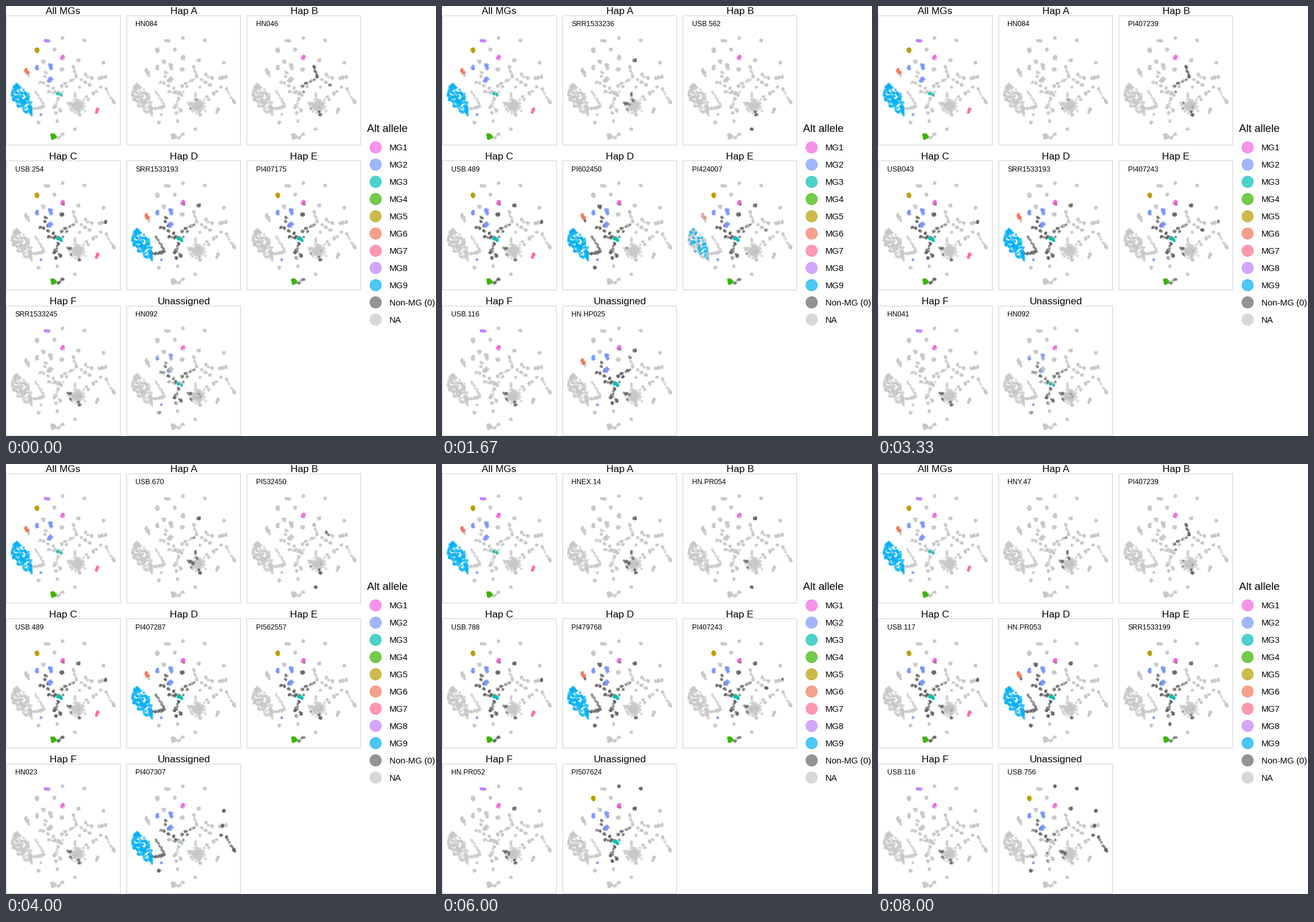
Write a matplotlib script that moves like this. It is 748x748 px and loops after 8.33 s.

```python
import numpy as np
import matplotlib.pyplot as plt
from matplotlib.animation import FuncAnimation
from matplotlib.colors import to_rgba
from matplotlib.patches import Circle, Rectangle

SIZE, DPI = 748, 100
PX = 72 / DPI
COL, ROW = 209.4, 252.4
ALPHA = 0.7
TICKS, LOOP_MS = 25, 8330

COLORS = {
    "MG1": "#F564E3", "MG2": "#7997FF", "MG3": "#00C0B4", "MG4": "#39B600",
    "MG5": "#B79F00", "MG6": "#F5785A", "MG7": "#FF6C90", "MG8": "#BF80FF",
    "MG9": "#00B0F6", "Non-MG (0)": "#666666", "NA": "#C8C8C8",
}

rng = np.random.default_rng(7)
keys, chunks = [], []


def add(key, xy):
    chunks.append(xy)
    keys.extend([key] * len(xy))


def blob(key, spread, count, *centres):
    """Scatter count dots in a disc or ellipse round every centre."""
    for centre in centres:
        angle = rng.uniform(0, 2 * np.pi, count)
        radius = np.sqrt(rng.uniform(0, 1, count))
        ring = np.column_stack([np.cos(angle), np.sin(angle)])
        add(key, np.array(centre) + ring * radius[:, None] * np.array(spread))


def trail(key, count, jitter, *points):
    """Dots along a polyline."""
    px, py = np.array(points, float).T
    s = np.linspace(0, len(points) - 1, count)
    k = np.arange(len(points))
    xy = np.column_stack([np.interp(s, k, px), np.interp(s, k, py)])
    add(key, xy + rng.normal(0, jitter, xy.shape))


def cloud(key, count):
    x, y = rng.uniform(9, 46, count), rng.uniform(135, 190, count)
    rows = [135, 142, 150, 158, 166, 174, 182, 190]
    left = np.interp(y, rows, [15, 12, 10, 9, 13, 20, 30, 41])
    right = np.interp(y, rows, [19, 27, 37, 42, 44, 44, 44, 45])
    inside = (x > left) & (x < right)
    add(key, np.column_stack([x, y])[inside])


def star(key, cx, cy):
    blob(key, 7, 34, (cx, cy))
    for angle in np.arange(14) * np.pi / 7 + 0.1:
        reach = rng.uniform(9, 17)
        end = (cx + reach * np.cos(angle), cy + reach * np.sin(angle))
        trail(key, 4, 0.6, (cx, cy), end)


# Dots that are grey in every panel
blob("rest", 2, 7, (84, 76), (149, 125), (152, 152), (138, 133), (163, 126))
blob("rest", 1.4, 3, (143, 163), (157, 149), (131, 128), (140, 157), (128, 141))

# Grey or dark groups
star("hub", 125, 174)
trail("hubn", 6, 0.8, (119, 151), (120, 157), (123, 165))
blob("hubw", 2, 4, (111, 170), (115, 173))
blob("hubw", 0.8, 1, (107, 169), (113, 180))
blob("hubs", 1.7, 5, (128, 189))
blob("hubs", 1, 2, (126, 184))
blob("top", 1.8, 6, (98.5, 55.5), (136.5, 59.5))
blob("ne", 2, 7, (126, 94.5))
blob("n1", 2.4, 8, (97, 110))
blob("ear", 2.6, 8, (64.6, 96.5))
blob("mid", 1.6, 3, (60, 133), (66, 134), (67, 123), (73, 139))
blob("mid", 2.6, 3, (69, 116), (72, 129))
blob("hook", 1.6, 4, (75, 149.5), (83, 143))
blob("hook", 2.2, 6, (85, 150))
trail("hook", 3, 0.8, (80, 151), (91, 149))
blob("steps", 1.8, 5, (103, 134), (97, 139))
blob("steps", 1.4, 3, (105, 141), (114, 129))
trail("steps", 4, 1, (100, 148), (108, 136), (118, 128))
blob("lon", 2, 6, (118, 106), (122, 122))
trail("lon", 3, 0.7, (119, 112), (121, 117))
blob("south", 1.7, 5, (91, 161), (84, 176), (86, 186), (94, 182))
trail("south", 3, 0.8, (89, 165), (85, 172))
trail("south", 2, 0.8, (89, 175), (92, 179))
trail("tail", 15, 1.1, (44, 177), (52, 179), (60, 178), (66, 174))
trail("tail", 9, 0.8, (50, 148), (57, 158), (62, 167), (65, 174))
blob("right", 2, 7, (169.5, 98.5), (167, 124.5))
blob("right", 1.5, 4, (164.5, 141.5), (174.5, 144))
trail("right", 6, 0.5, (174.5, 144), (178.5, 152), (183, 160), (186, 164))
blob("right", 2.4, 8, (187.5, 167))
blob("east", 2, 6, (172.5, 123.5))
blob("e1", 2, 6, (146, 137))
blob("e2", 1.7, 5, (138, 119))
blob("e2", 1, 2, (142, 123))
blob("sw", 2, 6, (57, 202))
blob("s1", 1.5, 4, (89, 200))
blob("s2", 1.7, 5, (120, 214))
blob("foot", 1.5, 4, (91, 229), (98.5, 223.5))
trail("foot", 2, 0.5, (93, 227), (96, 225))

# Marker groups
cloud("MG9", 235)
blob("MG8", 1.9, 5, (69, 59), (74, 61))
blob("MG5", (3.6, 2.6), 13, (54, 76.5))
blob("MG5", 1, 2, (54, 80))
blob("MG6", (2.2, 2.8), 8, (35.5, 112), (37.5, 116))
blob("ear", 0.8, 2, (39.5, 121))
blob("MG2", (2, 3), 9, (54, 107))
blob("MG2", (3.2, 2.2), 9, (77, 103))
blob("MG2", 2.2, 6, (78, 109))
blob("MG2", (3.8, 2.1), 9, (79, 126))
blob("MG2", 2.1, 6, (76, 130.5))
blob("MG2", 0.7, 2, (61, 188.5))
blob("MG1", 1.8, 6, (99, 88))
blob("MG1", 1.4, 4, (97, 91))
blob("steps", 0.5, 1, (100, 92.5))
blob("MG3", (3.2, 2.1), 13, (92.5, 152.5))
blob("MG3", 1.4, 4, (96, 155))
blob("MG4", (4.8, 4.2), 27, (82, 227))
blob("MG7", 1.8, 6, (159, 180))
blob("MG7", 1.4, 5, (157.5, 184.5))

DOTS = np.concatenate(chunks)
RANK = rng.uniform(0, 1, len(DOTS))
MEMBERS = {key: np.array(keys) == key for key in set(keys)}

C = "MG1 MG2 MG3 MG4 MG5 MG7 mid hook steps*.7 south n1 foot east hubw*.5 hubs*.4 "
D = "MG1 MG2 MG3 MG6 MG9 mid tail*.9 hook steps*.8 south "
E = "MG1 MG2 MG3 MG4 MG5 mid*.9 hook steps*.8 south*.9 foot*.7 hub*.05 n1 "
F = "MG1 MG8 hubw*.5 hubs*.7 hub*.03 "

# Title, (column, row), order of the samples, samples as (label, "group*share ...")
PANELS = [
    ("Hap A", (1, 0), "035214620563104235614026", [
        ("HN084", "hubn*.2 hub*.03"),
        ("SRR1533236", "ne*.7 hubw*.7 hubn*.3"),
        ("USB.317", "hubn*.4 hubs"),
        ("USB.670", "ne hubw hubn*.6 hubs steps*.1"),
        ("USB.787", "ne*.8 hubw*.8 hubn*.2 hubs*.6"),
        ("HNEX.14", "ne*.7 hubw hubn*.4 hubs*.7 hub*.05"),
        ("HNY.47", "hubn*.5 hubw*.5 steps*.1 hub*.04"),
    ]),
    ("Hap B", (2, 0), "026315026153064215302616", [
        ("HN046", "MG1 lon steps*.5 e1*.5 hubs*.7 hub*.03"),
        ("USB.562", "MG1 hubs*.7 s2"),
        ("PI378684A", "MG1 lon steps*.5 e1 hubs*.5 s1"),
        ("PI532450", "MG1 e2*.5 hub*.05 hubs s2 lon*.1"),
        ("SRR1533162", "MG1 MG9*.4 MG2*.12 MG3*.3 mid*.2 tail*.4 steps*.4 lon*.8 ne*.6 hook*.3"),
        ("HN.PR054", "MG1 ne hubw*.5 s2"),
        ("PI407239", "MG1 lon steps*.5 hub*.06 hubw*.3 hubs"),
    ]),
    ("Hap C", (0, 1), "042516024653024615042156", [
        ("USB.254", C),
        ("USB.489", C + "ne"),
        ("USB.799", C),
        ("USB.489", C + "ne*.9"),
        ("USB043", C + "ear*.3"),
        ("USB.788", C + "ne"),
        ("USB.117", C + "hub*.08"),
    ]),
    ("Hap D", (1, 1), "063512420613504165230416", [
        ("SRR1533193", D + "ne*.6"),
        ("PI602450", D + "ear sw hubw*.3 lon*.1"),
        ("SRR1533188", D + "ne*.6 hubs*.5"),
        ("PI407287", D + "n1"),
        ("PI407240", D + "n1 ear*.5"),
        ("PI479768", D + "ear ne sw hubs*.5"),
        ("HN.PR053", D + "ear ne sw hubs*.4"),
    ]),
    ("Hap E", (2, 1), "052613025463124035602346", [
        ("PI407175", E + "hubs*.6"),
        ("PI424007", E + "MG6*.4 MG9*.4 ne*.6 e1*.5"),
        ("PI378690", E + "e1 hubw*.4"),
        ("PI562557", E + "hubs"),
        ("PI378684B", E + "ne*.7 e1 e2*.5 east*.5 s1"),
        ("PI407243", E + "ne e1 hubw*.5 east*.5"),
        ("SRR1533199", E + "ne*.8 hubs*.6 s1"),
    ]),
    ("Hap F", (0, 2), "031313522503024105013506", [
        ("SRR1533245", F + "hub*.05"),
        ("USB.116", F),
        ("HN041", F),
        ("HN023", F),
        ("SRR1533245", F + "hub*.05"),
        ("HN.PR052", F + "hubw*.9 ne*.7"),
        ("USB.116", F),
    ]),
    ("Unassigned", (1, 2), "025316420363154025613046", [
        ("HN092", "MG1*.5 MG2*.6 MG3*.8 mid*.4 hook*.6 steps*.6 south*.8 hub*.1 hubw*.5 sw*.3"),
        ("HN.HP025", "MG1 MG2 MG3 MG6 mid*.9 hook steps south ne*.6 hubw*.7 lon*.3"),
        ("PI378698", "MG1 MG5*.5 MG2*.12 lon steps*.7 e1 hubn*.3 s1 mid*.3 hub*.05"),
        ("PI407307", "MG1 MG2 MG9 MG3*.12 mid*.6 tail hook*.8 steps*.6 right sw"),
        ("SoyW02", "MG1 MG2 MG6 mid*.5 hook*.7 tail*.5 steps*.5 south*.5 hub*.12 hubw right sw ne*.5"),
        ("PI507624", "MG1 MG2 MG3 MG5 top ne mid*.6 hook steps*.8 south"),
        ("USB.756", "MG1 MG2 MG5*.9 top ne*.6 mid*.6 hook*.7 steps*.3 south*.3 tail*.2 right sw hubw"),
    ]),
]
OVERVIEW = "MG1*.85 MG2*.95 MG3*.8 MG4 MG5*.9 MG6*.85 MG7*.85 MG8*.9 MG9"


def paint(spec):
    colors = np.tile(to_rgba(COLORS["NA"], ALPHA), (len(DOTS), 1))
    for item in spec.split():
        key, _, share = item.partition("*")
        chosen = MEMBERS[key] & (RANK < float(share or 1))
        colors[chosen] = to_rgba(COLORS.get(key, COLORS["Non-MG (0)"]), ALPHA)
    return colors


fig = plt.figure(figsize=(SIZE / DPI, SIZE / DPI), dpi=DPI, facecolor="white")
ax = fig.add_axes([0, 0, 1, 1])
ax.set_xlim(0, SIZE)
ax.set_ylim(SIZE, 0)
ax.axis("off")


def write(x, y, text, size, **style):
    return ax.text(x, y, text, fontsize=size * PX, family="Liberation Sans",
                   va="baseline", color="black", **style)


def panel(title, cell, spec):
    dx, dy = cell[0] * COL, cell[1] * ROW
    dots = ax.scatter(DOTS[:, 0] + dx, DOTS[:, 1] + dy, s=(4.7 * PX) ** 2,
                      c=paint(spec), linewidths=0, zorder=2)
    ax.add_patch(Rectangle((0.6 + dx, 17 + dy), 198, 224.8, fill=False,
                           ec="#E5E5E5", lw=2 * PX, zorder=3))
    write(99.6 + dx, 14.2 + dy, title, 17.3, ha="center", zorder=4)
    return dots, write(15.8 + dx, 35.2 + dy, "", 12.4, zorder=4)


def legend():
    write(628.5, 219.4, "Alt allele", 18.8)
    for i, (name, color) in enumerate(COLORS.items()):
        y = 246 + 29.95 * i
        ax.add_patch(Circle((643, y), 9.9, fc=to_rgba(color, ALPHA),
                            ec=to_rgba(color, ALPHA), lw=PX))
        write(667, y + 5.4, name, 15)


panel("All MGs", (0, 0), OVERVIEW)
views = [panel(title, cell, "") for title, cell, _, _ in PANELS]
looks = [[paint(spec) for _, spec in samples] for *_, samples in PANELS]
legend()


def draw(tick):
    step = max(0, tick - 1)  # the first sample set is held for two ticks
    changed = []
    for (dots, label), look, (_, _, order, samples) in zip(views, looks, PANELS):
        pick = int(order[step])
        dots.set_facecolors(look[pick])
        label.set_text(samples[pick][0])
        changed += [dots, label]
    return changed


anim = FuncAnimation(fig, draw, frames=TICKS, interval=LOOP_MS / TICKS,
                     repeat=True, repeat_delay=0)
plt.show()
```
